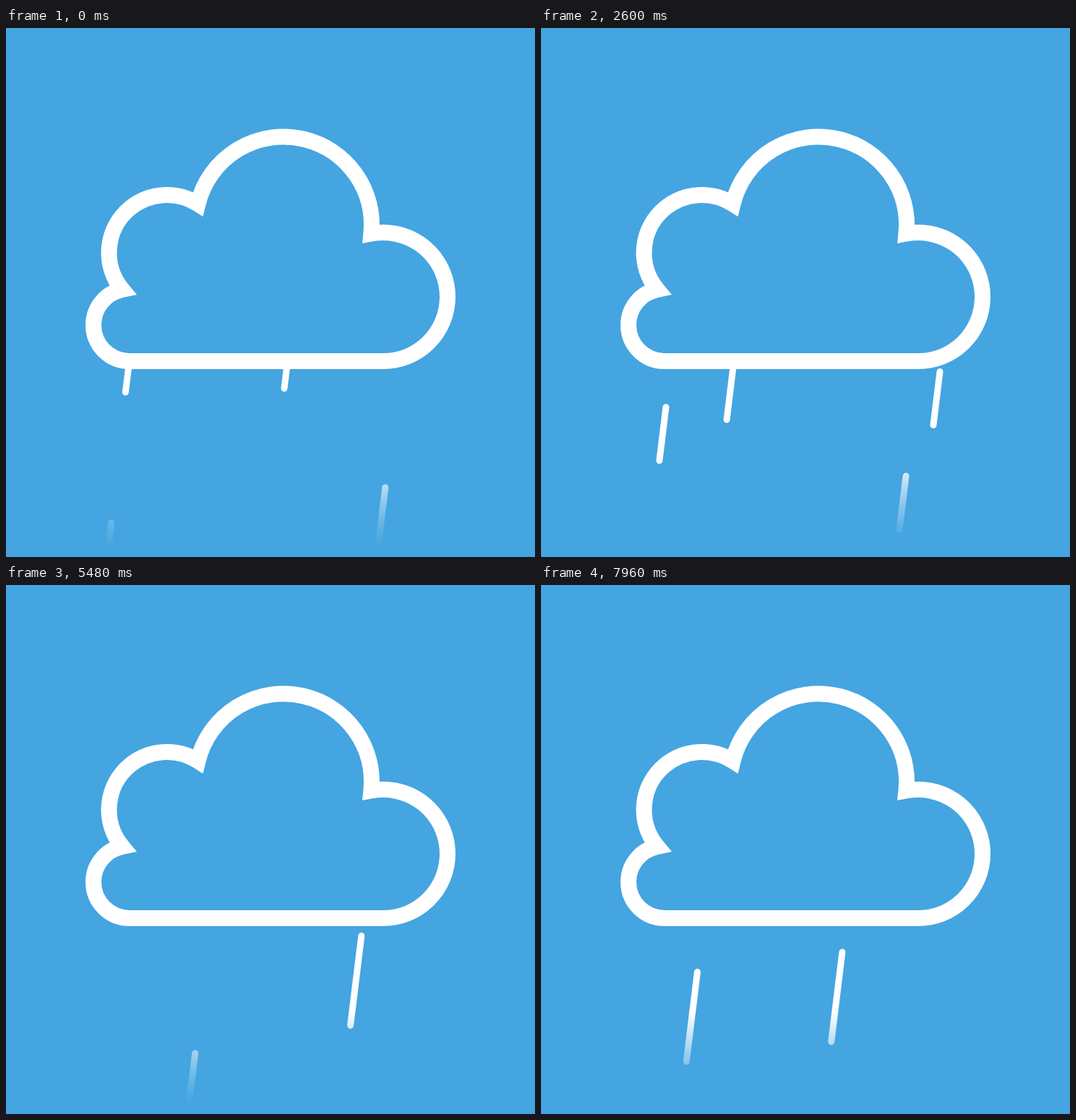
Write an HTML page with a canvas that moves like this. It is 732 px wide and 732 px high and loops after 8 s.

```html
<!DOCTYPE html>
<html lang="en">
<head>
<meta charset="utf-8">
<title>Rain cloud</title>
<style>
html, body { margin: 0; width: 100%; height: 100%; overflow: hidden; background: #44a5e1; }
canvas { display: block; width: 732px; height: 732px; }
</style>
</head>
<body>
<canvas id="stage" width="732" height="732"></canvas>
<script>
const ctx = document.getElementById("stage").getContext("2d");
const SIZE = 732;
const SKY = "#44a5e1";
const LOOP = 8000;
const STEP = 40;
const BASE = 472;      // lower edge of the cloud
const SLANT = Math.tan(7 * Math.PI / 180);

// Two kinds of rain. Each shower returns after a period, drifting to the right.
// A seed is [x on the base line, time its tip leaves the cloud].
const light = {
  from: -600, to: 4000, length: 74, speed: 0.745, period: 2815, drift: 7.4,
  seeds: [[172, -385], [545, -319], [169.3, -43], [388.3, -36], [515.8, -513],
          [508.2, 515], [164.6, 642], [383.2, 649], [265.6, 2506]]
};
const heavy = {
  from: 4000, to: LOOP, length: 124, speed: 1.25, period: 3364, drift: 48,
  seeds: [[176.2, 4446], [373.3, 4468], [162.7, 6118], [450.2, 6123], [536.2, 6202]]
};
const kindAt = time => time < heavy.from ? light : heavy;

const drops = [];
function addDrop(x, time) {
  drops.push({ x, time, kind: kindAt(time) });
}

for (const kind of [light, heavy]) {
  for (const [x, start] of kind.seeds) {
    for (let k = 0; start + k * kind.period < kind.to; k++) {
      addDrop(x + k * kind.drift, start + k * kind.period);
    }
  }
}

// Scattered drops between the showers: [from, to].
const gaps = [[90, 440], [930, 2160], [2650, 3240], [3730, 4380], [4720, 5970], [6330, 7650]];
let n = 0;
for (const [from, to] of gaps) {
  for (let time = from; time < to; time += 130) {
    addDrop(180 + 340 * ((++n * 0.618) % 1), time);
  }
}

// Cloud outline: four circles joined where they cross, clockwise from bottom left.
const lobes = [
  { x: 171, y: 411, r: 50 },
  { x: 222.5, y: 311, r: 80 },
  { x: 384, y: 272.5, r: 122 },
  { x: 522, y: 372, r: 89 }
];

// Outer crossing point of two neighbouring circles.
function crossing(a, b) {
  const dx = b.x - a.x, dy = b.y - a.y;
  const d = Math.hypot(dx, dy);
  const along = (d * d + a.r * a.r - b.r * b.r) / (2 * d);
  const side = Math.sqrt(a.r * a.r - along * along);
  return { x: a.x + (dx * along + dy * side) / d, y: a.y + (dy * along - dx * side) / d };
}

const foot = c => ({ x: c.x, y: c.y + c.r });
const angle = (c, p) => Math.atan2(p.y - c.y, p.x - c.x);

const cloud = new Path2D();
lobes.forEach((c, i) => {
  const start = i > 0 ? crossing(lobes[i - 1], c) : foot(c);
  const end = i < lobes.length - 1 ? crossing(c, lobes[i + 1]) : foot(c);
  cloud.arc(c.x, c.y, c.r, angle(c, start), angle(c, end));
});
cloud.closePath();

const fade = ctx.createLinearGradient(0, 590, 0, 720);
for (const [stop, alpha] of [[0, 1], [0.46, 0.46], [0.77, 0.14], [1, 0]]) {
  fade.addColorStop(stop, `rgba(255,255,255,${alpha})`);
}

function drawDrop({ x, time, kind }, t) {
  const tip = (t - time) * kind.speed;
  const tail = tip - kind.length;
  if (tip < -15 || BASE + tail > SIZE) return;
  ctx.beginPath();
  ctx.moveTo(x - tail * SLANT, BASE + tail);
  ctx.lineTo(x - tip * SLANT, BASE + tip);
  ctx.stroke();
}

function draw(t) {
  ctx.fillStyle = SKY;
  ctx.fillRect(0, 0, SIZE, SIZE);

  ctx.strokeStyle = fade;
  ctx.lineWidth = 9;
  ctx.lineCap = "round";
  for (const drop of drops) drawDrop(drop, t);

  // The cloud hides drops that have not left it yet.
  ctx.fill(cloud);
  ctx.strokeStyle = "#fff";
  ctx.lineWidth = 22;
  ctx.lineJoin = "miter";
  ctx.stroke(cloud);
}

const begin = performance.now();
function tick() {
  const t = (performance.now() - begin) % LOOP;
  draw(Math.floor(t / STEP) * STEP);
  requestAnimationFrame(tick);
}
tick();
</script>
</body>
</html>
```
